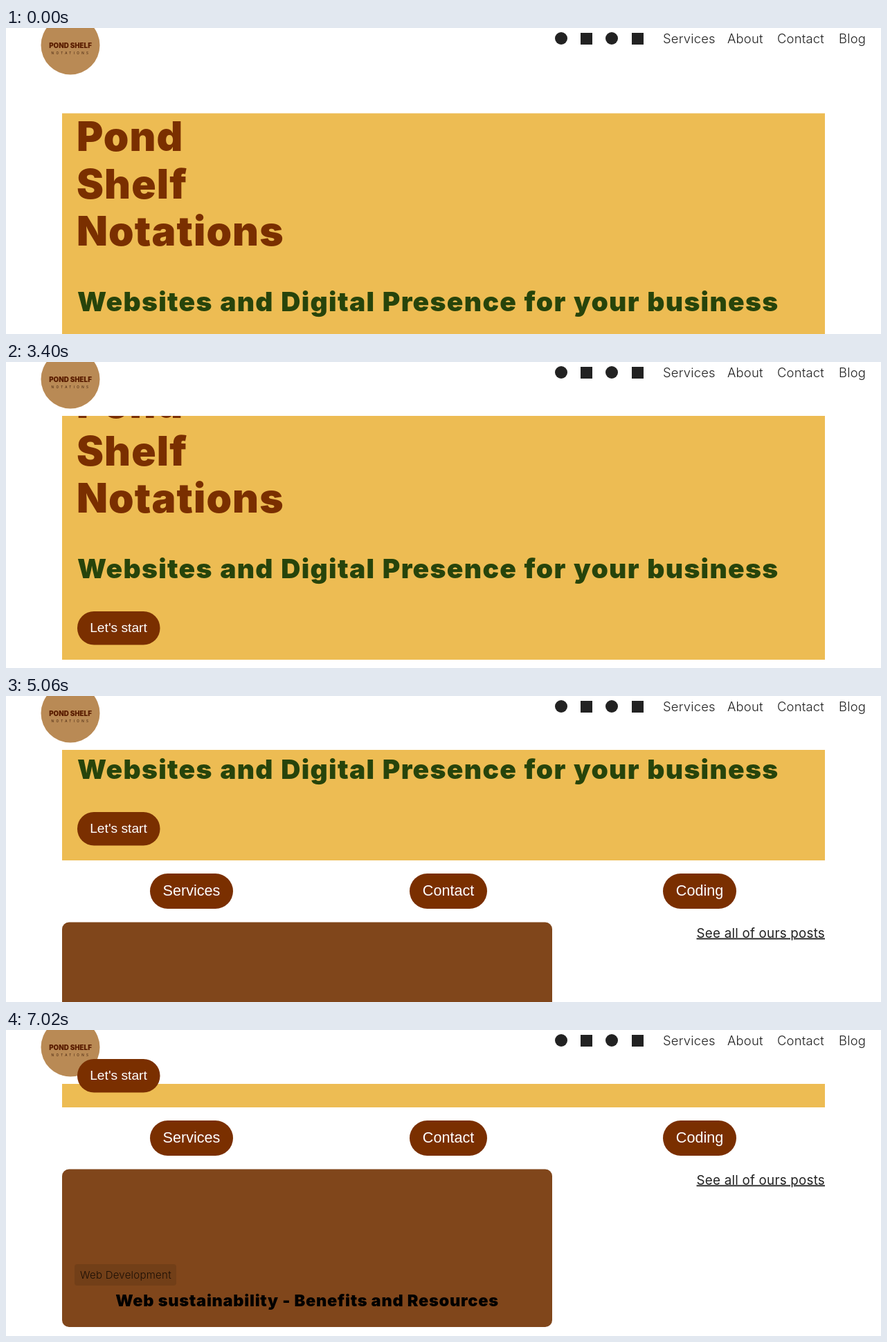
These frames come from a looping animation (1264 px wide and 443 px high, 8 s). An HTML page:

```html
<!DOCTYPE html>
<html lang="en">
<head>
<meta charset="utf-8">
<title>Pond Shelf Notations</title>
<style>
  html, body { margin: 0; width: 100%; height: 100%; overflow: hidden; background: #fff; }
  svg { display: block; width: 1264px; height: 443px; }
  text { font-family: Inter, sans-serif; }
  .nav { font-size: 18.4px; font-weight: 300; letter-spacing: .2px; fill: #222; }
  .black { font-weight: 900; }
  .hero { font-size: 58.5px; letter-spacing: 1.1px; fill: #7a2f00; }
  .sub { font-size: 39px; letter-spacing: 1.3px; word-spacing: 1.3px; fill: #27440b; }
  .title { font-size: 23.6px; letter-spacing: .7px; text-anchor: middle; }
  .btn text { font-family: "Liberation Sans", Arial, sans-serif; fill: #fff; text-anchor: middle; }
  .btn rect { fill: #7a2f00; }
  .more { font-size: 18.8px; letter-spacing: .22px; fill: #222; text-anchor: end; text-decoration: underline; }
</style>
</head>
<body>
<svg viewBox="0 0 1264 443">
  <defs><clipPath id="below"><rect y="78" width="1264" height="365"/></clipPath></defs>

  <g id="header">
    <circle cx="93" cy="25" r="42.5" fill="#b98a55"/>
    <text x="93" y="29" class="black" font-size="9.8" fill="#5a1d00" text-anchor="middle">POND SHELF</text>
    <text x="94" y="37.5" font-size="4.6" letter-spacing="3.4" fill="#3a1a08" text-anchor="middle">NOTATIONS</text>
    <g fill="#222">
      <circle cx="802" cy="15" r="9"/>
      <rect x="830" y="7" width="17" height="17"/>
      <circle cx="875" cy="15" r="9"/>
      <rect x="904" y="7" width="17" height="17"/>
    </g>
    <g class="nav">
      <text x="949" y="22">Services</text>
      <text x="1042" y="22">About</text>
      <text x="1114" y="22">Contact</text>
      <text x="1203" y="22">Blog</text>
    </g>
  </g>

  <g clip-path="url(#below)">
    <g class="scroll">
      <rect x="81" y="123.5" width="1102" height="404.5" fill="#edbc53"/>
      <g class="black hero">
        <text x="102" y="178">Pond</text>
        <text x="102" y="246.5">Shelf</text>
        <text x="102" y="315">Notations</text>
      </g>
      <text class="black sub" x="103" y="409.5">Websites and Digital Presence for your business</text>
      <g class="btn" font-size="21.6">
        <rect x="208" y="547" width="120" height="51" rx="25.5"/>
        <text x="268" y="579">Services</text>
        <rect x="583" y="547" width="112" height="51" rx="25.5"/>
        <text x="639" y="579">Contact</text>
        <rect x="949" y="547" width="106" height="51" rx="25.5"/>
        <text x="1002" y="579">Coding</text>
      </g>
      <rect x="81" y="617.5" width="708" height="228.5" rx="10" fill="#80461b"/>
      <rect x="99" y="755" width="147" height="31" rx="4" fill="#723f18"/>
      <text x="107" y="776" font-size="15" font-weight="300" letter-spacing=".25" fill="#1c0f05">Web Development</text>
      <text class="black title" x="435" y="816">Web sustainability - Benefits and Resources</text>
      <text class="more" x="1183" y="639.5">See all of ours posts</text>
    </g>
  </g>

  <g class="scroll btn" font-size="19.2">
    <rect x="103" y="458" width="119.5" height="48.5" rx="24"/>
    <text x="162.5" y="488">Let's start</text>
  </g>

  <path id="cursor" d="M1254.5 308.5v16l3.7-3.6 2.3 5 2.3-1-2.2-4.9h5z" fill="#fff" stroke="#000"/>
</svg>
<script>
  const LOOP = 8000;
  // Scroll bursts: start ms, end ms, steps, first offset, last offset
  const bursts = [
    [3000, 3710, 10, 14, 163],
    [3800, 4030, 4, 177, 205],
    [4510, 5060, 8, 210, 290],
    [5140, 5220, 2, 300, 308],
    [5600, 5760, 3, 314, 326],
    [5930, 6080, 3, 331, 345],
    [6540, 7020, 7, 352, 416]
  ];
  const layers = document.querySelectorAll('.scroll');
  const cursor = document.getElementById('cursor');

  function scrollAt(t) {
    let y = 0;
    for (const [start, end, steps, from, to] of bursts) {
      if (t < start) break;
      const last = steps - 1;
      const step = Math.min(last, Math.floor((t - start) / (end - start) * last + 0.05));
      y = Math.round(from + (to - from) * step / last);
    }
    return y;
  }

  function draw(t) {
    const y = scrollAt(t);
    layers.forEach(g => g.setAttribute('transform', `translate(0 ${-y})`));
    cursor.style.display = t >= 520 && t < 600 ? '' : 'none';
  }

  const origin = performance.now();
  function tick() {
    draw((performance.now() - origin) % LOOP);
    requestAnimationFrame(tick);
  }
  draw(0);
  requestAnimationFrame(tick);
</script>
</body>
</html>
```
